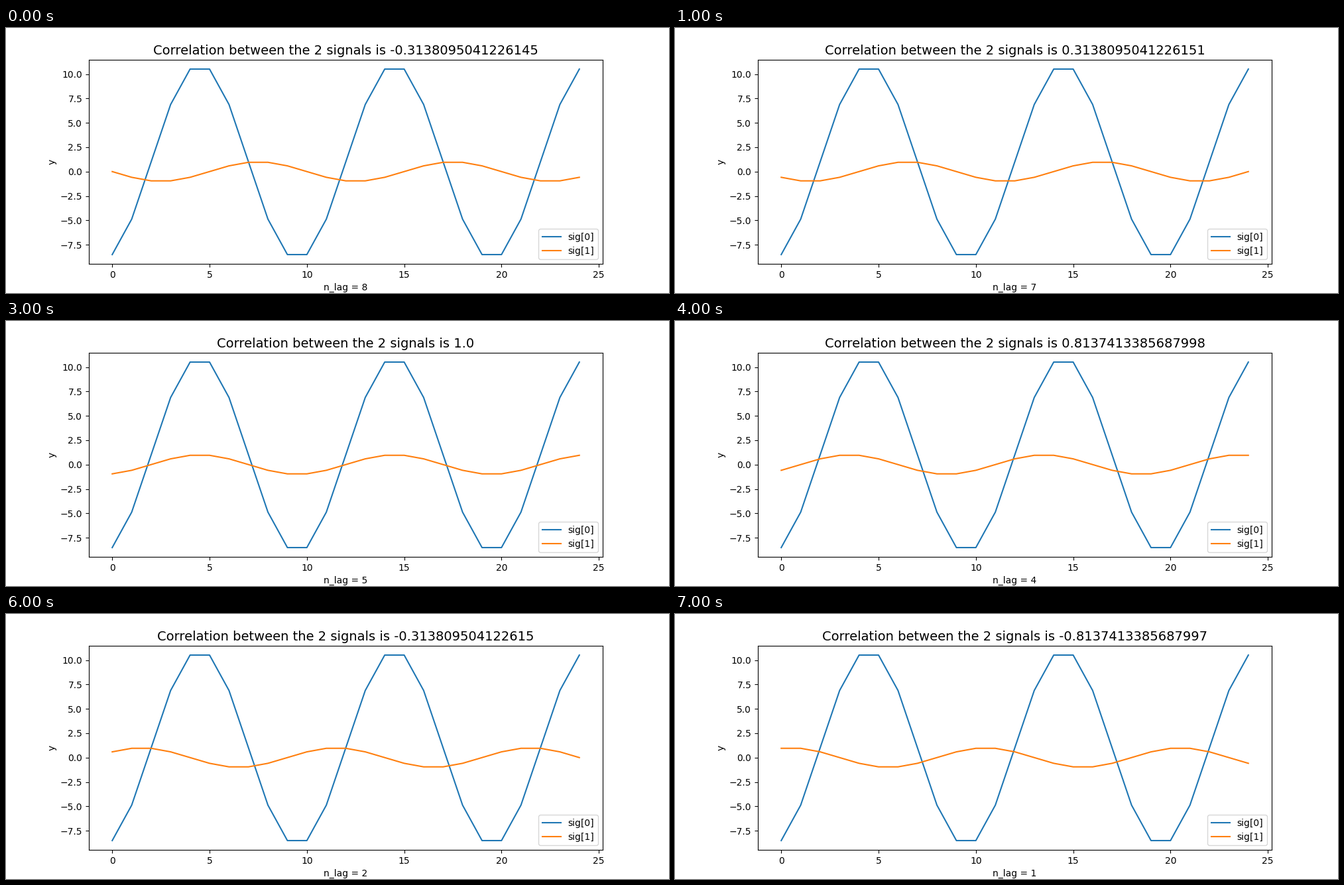
These frames come from a looping animation (1000x400 px, 8 s). A matplotlib script:

```python
import numpy as np
import matplotlib.pyplot as plt
from matplotlib.animation import FuncAnimation

PERIOD = 10
x = np.arange(25)

# Correlation per lag, kept as text so the rounding digits stay stable.
CORRELATION = {
    8: "-0.3138095041226145",
    7: "0.3138095041226151",
    6: "0.8137413385687998",
    5: "1.0",
    4: "0.8137413385687998",
    3: "0.3138095041226146",
    2: "-0.313809504122615",
    1: "-0.8137413385687997",
}
LAGS = list(CORRELATION)


def wave(shift):
    return np.sin(2 * np.pi * (x - shift) / PERIOD)


fig, ax = plt.subplots(figsize=(10, 4), dpi=100)
ax.plot(x, 10 * wave(2) + 1, label="sig[0]")
lagged, = ax.plot(x, wave(LAGS[0] - 3), label="sig[1]")
ax.set_ylabel("y")
ax.legend(loc="lower right")


def update(frame):
    lag = LAGS[frame]
    lagged.set_ydata(wave(lag - 3))
    ax.set_title(f"Correlation between the 2 signals is {CORRELATION[lag]}", fontsize=14)
    ax.set_xlabel(f"n_lag = {lag}")
    return [lagged]


anim = FuncAnimation(fig, update, frames=len(LAGS), interval=1000, repeat=True)
plt.show()
```
